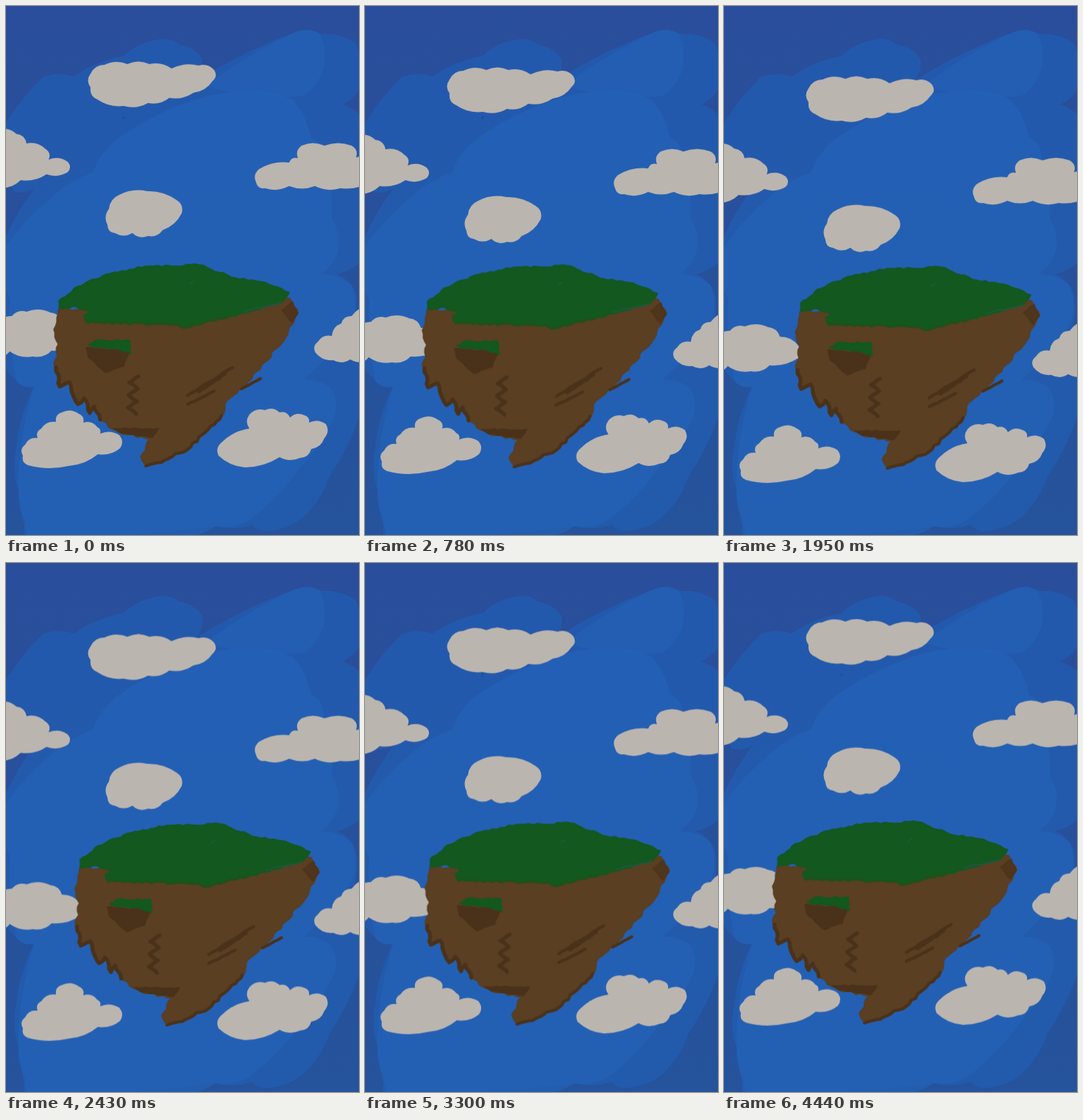
An HTML page that plays this animation: 480x720 px, repeating every 4500 ms.

```html
<!DOCTYPE html>
<html lang="en">
<head>
<meta charset="utf-8">
<title>Floating island</title>
<style>
html, body { margin: 0; width: 100%; height: 100%; overflow: hidden; background: #29509c; }
svg { display: block; width: 480px; height: 720px; }
path { stroke-linecap: round; stroke-linejoin: round; }
</style>
</head>
<body>
<svg viewBox="0 0 480 720">
  <defs>
    <linearGradient id="paint" x1="0" y1="0" x2="0" y2="1">
      <stop offset="0" stop-color="#2a4e9b"/>
      <stop offset="1" stop-color="#25539c"/>
    </linearGradient>
  </defs>
  <rect width="480" height="720" fill="url(#paint)"/>
  <g id="sky"></g>
  <circle cx="160" cy="152" r="2" fill="#234f9c"/>
  <g id="clouds"></g>
  <g id="island"></g>
</svg>
<script>
const LOOP = 4500;
const EARTH = '#5a3f22', SHADE = '#4a321a', GRASS = '#13581f', MOSS = '#244f18';
const byId = id => document.getElementById(id);
const points = text => text.split(' ').map(pair => pair.split(',').map(Number));

function add(layer, d, attrs) {
  const path = document.createElementNS('http://www.w3.org/2000/svg', 'path');
  path.setAttribute('d', d);
  for (const key in attrs) path.setAttribute(key, attrs[key]);
  byId(layer).append(path);
}

// Direction and length from one point to the next
function span([x, y], [u, v]) {
  const length = Math.hypot(u - x, v - y);
  return { length, dx: (u - x) / length, dy: (v - y) / length };
}

// Clockwise outline in which every side swells outwards
function puffs(text, swell) {
  const p = points(text);
  return 'M' + p[0] + p.map((a, i) => {
    const b = p[(i + 1) % p.length];
    const { length, dx, dy } = span(a, b);
    const out = 2 * Math.min(length * 0.22, swell);
    return `Q${(a[0] + b[0]) / 2 + dy * out} ${(a[1] + b[1]) / 2 - dx * out} ${b}`;
  }).join('');
}

// The noise depends on place, so a part of an edge repeats exactly
const noise = (x, y) => Math.abs(Math.sin(x * 12.9898 + y * 78.233) * 43758.5453) % 1 - 0.5;

// Hand-drawn line through the points
function rough(p, wobble, step = 6) {
  const path = [p[0]];
  for (let i = 1; i < p.length; i++) {
    const [a, b] = [p[i - 1], p[i]];
    const { length, dx, dy } = span(a, b);
    const n = Math.ceil(length / step);
    for (let k = 1; k < n; k++) {
      const x = a[0] + dx * length * k / n, y = a[1] + dy * length * k / n;
      const shift = 2 * wobble * noise(x, y);
      path.push([x + dy * shift, y - dx * shift]);
    }
    path.push(b);
  }
  return 'M' + path.join('L');
}

const shape = (p, fill, wobble, more) =>
  add('island', rough([...p, p[0]], wobble) + 'Z', { fill, stroke: fill, 'stroke-width': 1.5, ...more });
const line = (p, stroke, width, wobble, more) =>
  add('island', rough(p, wobble), { fill: 'none', stroke, 'stroke-width': width, ...more });

// Sky, painted in overlapping washes
const washes = [
  ['-9,175 50,97 92,96 160,68 205,46 236,53 267,72 258,102 395,35 428,38 475,50 485,105 457,134 490,160 490,340 450,365 476,392 470,450 485,545 440,640 405,695 360,714 335,706 285,708 28,725 28,703 17,660 14,600 38,518 14,510 -9,470 -9,335 40,247 10,252', '#225fb4', 0.7],
  ['-9,340 60,262 118,227 150,182 250,130 330,116 390,128 415,180 431,200 443,290 452,330 428,365 470,380 472,430 404,509 442,520 447,557 400,628 330,700 285,708 240,722 30,722 17,640 38,518 14,510 6,400', '#2464ba', 0.6],
  ['272,108 395,35 427,38 432,85 405,122 330,116', '#2464ba', 0.5]
];
for (const [text, fill, opacity] of washes) add('sky', puffs(text, 4), { fill, opacity });

const clouds = [
  '115,92 134,80 165,79 195,79 225,85 262,81 283,87 281,102 255,118 222,125 193,132 160,136 124,127 115,111',
  '-10,168 14,174 28,187 53,194 58,209 84,212 84,226 55,229 20,237 -10,248',
  '340,240 344,222 385,213 397,207 402,190 433,190 470,190 476,206 495,212 495,240 455,248 420,245 385,245 352,248',
  '138,298 140,276 154,257 192,252 232,264 239,282 213,305 193,313 172,309 148,309',
  '-10,432 8,422 28,416 60,417 76,430 101,442 101,459 62,469 37,477 5,470 -10,474',
  '421,472 424,457 443,449 456,432 470,422 495,408 495,482 468,481 445,482',
  '23,612 26,597 43,588 48,575 68,566 76,553 99,555 105,567 124,573 128,582 154,584 155,602 125,610 85,626 30,625',
  '289,612 293,594 331,575 331,556 352,550 372,553 386,560 406,557 412,567 435,569 433,588 415,603 400,615 372,614 325,628'
];
for (const text of clouds) add('clouds', puffs(text, 3.5), { fill: '#bbb5af' });

// Rock
const rock = points('71,413 65,440 71,460 66,492 71,518 84,512 96,542 104,534 112,554 118,545 126,563 155,581 196,589 183,613 191,627 222,617 252,601 268,584 294,558 298,541 326,515 352,485 380,452 397,418 386,398');
shape(rock, EARTH, 2);
line(rock.slice(3, 11), SHADE, 5, 2, { transform: 'translate(2 0)' });
line(rock.slice(14, 19), SHADE, 4, 2, { transform: 'translate(-1 -1)' });
shape(points('146,575 207,575 199,587 156,581'), SHADE, 1);
shape(points('375,414 390,403 397,418 389,430'), SHADE, 1, { opacity: 0.75 });

// Crack and scratches
const crack = Array.from({ length: 7 }, (_, i) => [174 - i / 2 + (i % 2 ? -6 : 6), 504 + i * 8.5]);
line(crack, SHADE, 5, 1);
for (const scratch of ['308,492 247,530', '298,501 262,525', '283,524 247,542', '346,507 320,521'])
  line(points(scratch), SHADE, 4, 0.7);

// Ledge
shape(points('109,465 168,470 160,490 136,499 112,478'), SHADE, 1);
shape(points('112,461 122,455 168,455 170,473 150,466 120,464'), GRASS, 1);

// Turf
const turf = points('72,412 72,401 96,382 136,365 190,354 262,352 312,370 352,376 385,390 374,404 300,424 241,438 232,433 110,431 106,421 113,416 90,409');
shape(turf, GRASS, 1.5);
line(turf.slice(10, 14), MOSS, 3, 1.5, { opacity: 0.7 });
line(points('325,415 373,404'), '#1d594b', 2, 1, { opacity: 0.8 });
line(points('250,378 255,375'), '#18603a', 1.5, 0);

// Out to (x, y) and back, turning at the given time
function drift(id, x, y, turn) {
  byId(id).animate([
    { transform: 'translate(0px, 0px)' },
    { transform: `translate(${x}px, ${y}px)`, offset: turn / LOOP },
    { transform: 'translate(0px, 0px)' }
  ], { duration: LOOP, iterations: Infinity });
}
drift('clouds', 0, 23.2, 2250);
drift('island', 33.8, 3.4, 2060);
</script>
</body>
</html>
```
